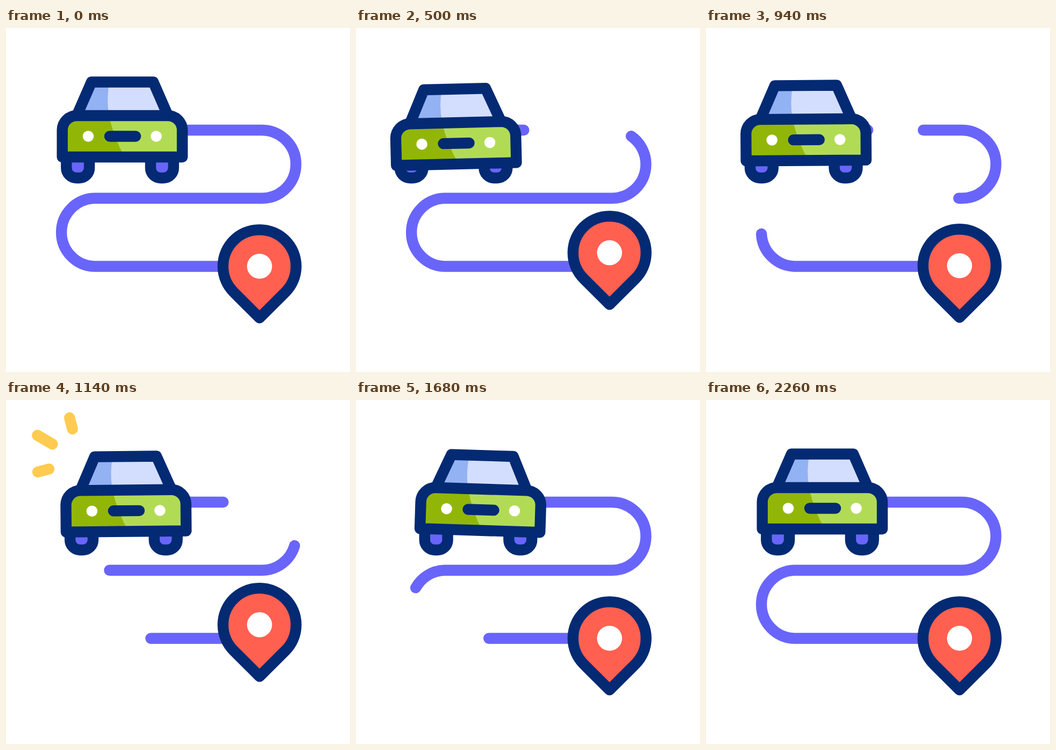
Write an HTML page that moves like this. It is 640 px wide and 640 px high and loops after 2.4 s.

```html
<!DOCTYPE html>
<html lang="en">
<head>
<meta charset="utf-8">
<title>Car route</title>
<style>
  html, body { margin: 0; width: 100%; height: 100%; overflow: hidden; background: #fff; }
  svg { display: block; width: 100%; height: 100%; }
  .line { stroke: #032a73; stroke-width: 20.4; stroke-linecap: round; stroke-linejoin: round; }
  .none { fill: none; }
</style>
</head>
<body>
<svg viewBox="0 0 640 640">
  <path id="road" class="line none" style="stroke:#6965fa"
    d="M217 190H476A63.4 63.4 0 0 1 476 316.8H164A63.4 63.4 0 0 0 164 443.5H472"/>
  <g id="sparks" class="line" style="stroke:#ffcb50"></g>
  <g id="pin">
    <path class="line" fill="#ff6050" d="M423.6 491.4A68 68 0 1 1 519.8 491.4L471.7 539.4Z"/>
    <circle cx="471.7" cy="443.3" r="23.3" fill="#fff"/>
  </g>
  <g id="car">
    <path id="wheel" class="line" fill="#6965fa" d="M112.3 225V260A18.7 18.7 0 0 0 131 279H136.4A18.7 18.7 0 0 0 155.1 260V225Z"/>
    <use href="#wheel" x="156.6"/>
    <g id="body">
      <path fill="#d3defe" d="M133 160L159 100.5H274L300 160Z"/>
      <path fill="#93b2f3" d="M133 160L159 100.5H192.5Q186.5 132 191.5 160Z"/>
      <path class="line none" d="M133 160L159 100.5H274L300 160"/>
      <path id="shell" fill="#b2db55" d="M104.7 240V190A27 27 0 0 1 131.7 163H301A27 27 0 0 1 328 190V240Z"/>
      <path fill="#92b608" d="M104.7 240V190A27 27 0 0 1 131.7 163H191.5Q201 205 220.5 240Z"/>
      <use href="#shell" class="line" style="fill-opacity:0"/>
      <path class="line none" d="M193 201.5H241"/>
      <circle cx="153" cy="201.5" r="10.3" fill="#fff"/>
      <circle cx="279.5" cy="201.5" r="10.3" fill="#fff"/>
    </g>
  </g>
</svg>
<script>
const LOOP = 2400;
const [road, sparks, pin, car, body] =
  ["road", "sparks", "pin", "car", "body"].map(id => document.getElementById(id));
const roadLength = road.getTotalLength();

const move = (node, transform) => node.setAttribute("transform", transform);

// Smooth step from 0 to 1 between two times.
function ease(t, from, to) {
  const u = Math.min(1, Math.max(0, (t - from) / (to - from)));
  return u * u * (3 - 2 * u);
}

// Suspension poses: time, sink, tilt in degrees.
const poses = [
  [40, 0, 0], [500, 13.1, -1.4], [740, 8.4, -0.3], [1140, 4.6, -0.55],
  [1440, 1, 0.9], [1680, 2.7, 1.8], [2260, 0, 0]
];
const pose = (t, part) => poses.slice(1).reduce((sum, next, i) =>
  sum + (next[part] - poses[i][part]) * ease(t, poses[i][0], next[0]), 0);

// Two gaps run along the road; each edge follows the same S-curve, later than the one before.
const edge = (t, middle) => roadLength / (1 + Math.exp(0.00445 * (middle - t)));

function drawRoad(t) {
  const stops = [1536, 1336, 1066, 768].map(middle => edge(t, middle));
  const dashes = stops.map((stop, i) => stop - (stops[i - 1] || 0));
  road.setAttribute("stroke-dasharray", [...dashes, 2 * roadLength].join(" "));
}

// Three sparks fan out from one centre, 45 degrees apart, the middle one longest.
const rays = [-1, 0, 1].map(side => {
  const line = document.createElementNS("http://www.w3.org/2000/svg", "line");
  const angle = (30.4 + 45 * side) * Math.PI / 180;
  sparks.append(line);
  return { line, length: side ? 25.7 : 38.7, dx: -Math.cos(angle), dy: -Math.sin(angle) };
});

function drawSparks(t) {
  const tail = ease(t, 1200, 1420), tip = ease(t, 972, 1198);
  sparks.style.display = tip > tail ? "" : "none";
  for (const { line, length, dx, dy } of rays) {
    [tail, tip].forEach((part, i) => {
      const r = 61 + length * part;
      line.setAttribute("x" + (i + 1), 139 + dx * r);
      line.setAttribute("y" + (i + 1), 113 + dy * r);
    });
  }
}

function draw(t) {
  drawRoad(t);
  drawSparks(t);

  const x = -48.7 * ease(t, 150, 750) + 77.9 * ease(t, 750, 1355) - 29.2 * ease(t, 1395, 1990);
  move(car, `translate(${x})`);
  move(body, `translate(0 ${pose(t, 1)}) rotate(${pose(t, 2)} 216.3 201.5)`);

  // Three hops of 320 ms each.
  const hopTime = Math.min(960, Math.max(0, t - 283));
  move(pin, `translate(0 ${17.75 * (Math.cos(hopTime / 160 * Math.PI) - 1)})`);
}

function tick() {
  draw(performance.now() % LOOP);
  requestAnimationFrame(tick);
}
tick();
</script>
</body>
</html>
```
